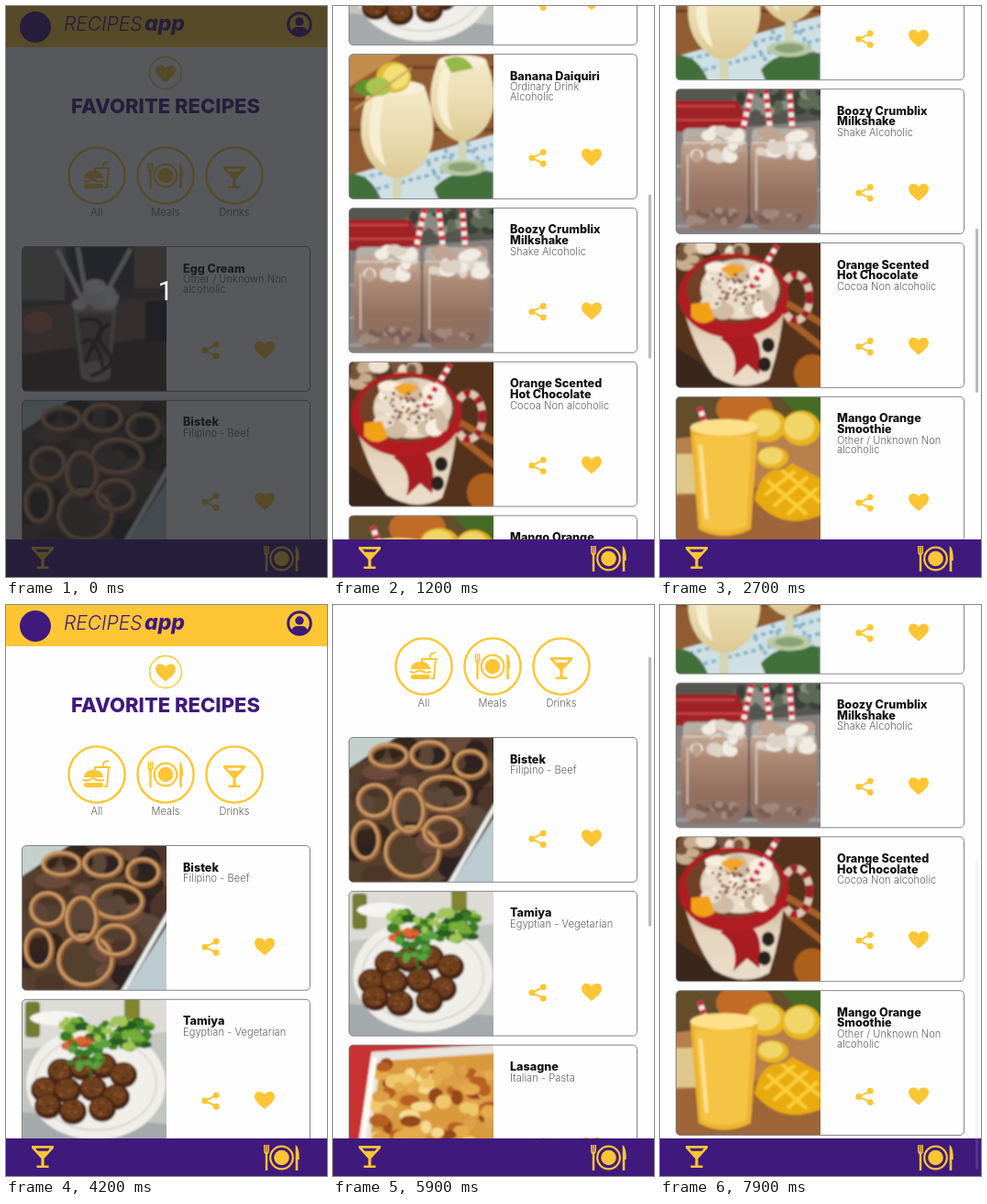
Recreate the animation shown at these times as an HTML page. Size 350 px wide and 623 px high, loop 8 s.

```html
<!DOCTYPE html>
<html lang="en">
<head>
<meta charset="utf-8">
<title>Favorite recipes</title>
<style>
  html, body { margin: 0; width: 100%; height: 100%; overflow: hidden; background: #fefefe; }
  svg { display: block; width: 100%; height: 100%; }
  text { font-family: Inter, "Open Sans", sans-serif; }
  .mid { text-anchor: middle; }
  .name { font-size: 12.6px; font-weight: 800; fill: #111; }
  .note { font-size: 11px; font-weight: 300; fill: #606060; letter-spacing: .1px; }
</style>
</head>
<body>
<svg id="stage" viewBox="0 0 350 623"></svg>
<script>
const YELLOW = '#fec635', PURPLE = '#40197d';
const LIST_TOP = 262.5, PITCH = 167.8, VIEW = 623, TRACK = 614, LOOP = 8000;

// Shape helpers
const P = (d, fill) => `<path d="${d}" fill="${fill}"/>`;
const L = (d, color, w, extra = '') =>
  `<path d="${d}" fill="none" stroke="${color}" stroke-width="${w}" ${extra}/>`;
const E = (x, y, rx, ry, fill) => `<ellipse cx="${x}" cy="${y}" rx="${rx}" ry="${ry}" fill="${fill}"/>`;
const R = (x, y, w, h, fill, r = 0) =>
  `<rect x="${x}" y="${y}" width="${w}" height="${h}" rx="${r}" fill="${fill}"/>`;
const ring = (x, y, rx, ry, color, w) =>
  `<ellipse cx="${x}" cy="${y}" rx="${rx}" ry="${ry}" fill="none" stroke="${color}" stroke-width="${w}"/>`;
const T = (x, y, cls, s) => `<text x="${x}" y="${y}" class="${cls}">${s}</text>`;
const at = (x, y, s) => `<g transform="translate(${x} ${y})">${s}</g>`;
const straw = (d, w = 6) => L(d, '#f5efea', w) + L(d, '#cf2430', w, 'stroke-dasharray="5 5"');
const base = color => R(-8, -8, 173, 173, color);
const shade = (id, ...colors) => `<linearGradient id="${id}" x2="0" y2="1">` +
  colors.map((c, i) => `<stop offset="${i / (colors.length - 1)}" stop-color="${c}"/>`).join('') + '</linearGradient>';

let seed = 7;
const rnd = (a, b) => a + (b - a) * (seed = seed * 16807 % 2147483647) / 2147483647;
const spots = (n, x0, y0, x1, y1, r, colors) => Array.from({ length: n }, (_, i) =>
  E(rnd(x0, x1), rnd(y0, y1), rnd(r * .6, r * 1.3), rnd(r * .5, r), colors[i % colors.length])).join('');

// Icons, centred on 0,0
const heart = P('M0 9C-3 6-11 1-11-4.5C-11-8-8.5-10-6-10C-3-10-1-8.5 0-6.5C1-8.5 3-10 6-10C8.5-10 11-8 11-4.5C11 1 3 6 0 9Z', YELLOW);
const share = L('M6-6L-6 0L6 6', YELLOW, 2) +
  [[-6.2, 0], [6.2, -6.2], [6.2, 6.2]].map(([x, y]) => E(x, y, 3.4, 3.4, YELLOW)).join('');
const glass = `<path fill-rule="evenodd" fill="${YELLOW}" d="M-12-12H12V-9.5L1.6 2V9.5H6.5V12H-6.5V9.5H-1.6V2L-12-9.5ZM-8-9.3H8L5.5-6.3H-5.5Z"/>`;
const plate = ring(0, 0, 12.3, 12.3, YELLOW, 2.2) + E(0, 0, 8.3, 8.3, YELLOW) +
  L('M-18.7-14V-8Q-18.7-4.5-16.5-4.5T-14.3-8V-14M-16.5-14V-5', YELLOW, 1.5) + L('M-16.5-5V14', YELLOW, 2.4) +
  P('M15.2-14Q19.3-12 19.3 2H17.8V14H15.2Z', YELLOW);
const burger = P('M-14 3C-14-8 7-8 7 3Z', YELLOW) + L('M-15 5.5Q-11 8-8 5.5T-1 5.5T8 5.5', YELLOW, 2.2) +
  R(-14, 9, 21, 5, YELLOW, 2) + L('M-2-5V-8H15M13-8L11 13H8M6-8L8-14L13-15', YELLOW, 2);
const user = ring(0, 0, 12.3, 12.3, PURPLE, 3) + E(0, -3, 4.7, 4.7, PURPLE) +
  P('M-9 8Q-7 3-3 3H3Q7 3 9 8Q0 15-9 8Z', PURPLE);

// Soft pictures on a 157 x 157 square
const goblet = (x, y, k) => `<g transform="translate(${x} ${y}) scale(${k})">` +
  R(-5, 48, 10, 38, '#d3d5b4') + E(0, 88, 28, 10, '#b9c9a4') + E(0, 87, 18, 6, '#8ba278') +
  P('M-30-44C-47 0-42 38-8 54H8C42 38 47 0 30-44Z', 'url(#cocktail)') +
  P('M-24-36C-36 2-31 30-12 42C-22 14-20-10-13-36Z', '#f8efd2') + E(0, -44, 30, 8, '#f7efd8') + '</g>';
const jar = x => R(x, 46, 73, 107, 'url(#shake)', 20) + R(x + 2, 42, 69, 17, '#b3aea6', 6) +
  spots(26, x + 9, 44, x + 64, 74, 8, ['#f0ebe3', '#ddd2c6', '#c0a390']) +
  spots(14, x + 10, 132, x + 63, 145, 5, ['#7d5f54', '#a1887c']) +
  L(`M${x + 2} 58H${x + 71}M${x + 7} 70V132`, '#d8d2cb', 1.5);

const pics = {
  cream: () => base('#51413c') + R(-8, -8, 54, 66, '#8b8072') + R(52, -8, 70, 48, '#38393f') +
    R(122, -8, 43, 53, '#8a7157') + P('M-8 66L165 54V165H-8Z', '#795746') + P('M-8 118L165 95V165H-8Z', '#4c332b') +
    E(17, 82, 16, 12, '#b7674c') + R(134, 58, 31, 45, '#20222a', 4) +
    L('M38 3L65 58M60 0L70 55M118 2L88 56', '#e5dcd6', 5) +
    P('M55 62H103L95 143Q79 151 64 143Z', '#a69486') + P('M60 72H98L93 125H66Z', '#776052') +
    L('M62 80Q94 74 82 97T69 127M96 83Q74 95 91 112T74 141M65 105Q78 90 88 132', '#302019', 4) +
    spots(20, 62, 48, 96, 64, 10, ['#f5efe9', '#e6dbd2']) + E(79, 43, 12, 8, '#fff8f0'),
  bistek: () => base('#55402f') +
    spots(60, 0, 0, 157, 157, 16, ['#35251f', '#4d362b', '#6b4c3b', '#2d2321', '#5c4639']) +
    P('M-8-8H62L-8 38Z', '#c4d0cc') + P('M165 75V165H108Z', '#bccbd0') + L('M160 72L106 165', '#e6ecea', 5) +
    [[28, 69, 18, 17], [104, 61, 27, 18], [69, 125, 29, 27], [43, 20, 20, 12], [88, 19, 20, 14], [132, 29, 17, 14],
     [65, 80, 16, 23], [18, 112, 14, 20], [102, 103, 20, 16]].map(([x, y, a, b]) =>
      ring(x, y, a, b, '#996238', 6) + ring(x - 1, y - 1, a, b, '#cfa26d', 2.5)).join(''),
  tamiya: () => base('#c3c5c1') + P('M-8-8H165V34L-8 55Z', '#dcdbd5') +
    R(3, 2, 16, 39, '#727b31', 4) + R(111, -8, 17, 30, '#82842d', 3) + P('M-8 122L165 136V165H-8Z', '#a4a9ab') +
    E(80, 91, 76, 62, '#f0eee9') + ring(80, 91, 66, 51, '#d7d7d3', 2) + E(38, 20, 30, 8, '#f5f4f0') +
    spots(75, 43, 22, 139, 53, 6, ['#397d22', '#75ad37', '#a1c556', '#265d20']) +
    spots(10, 48, 43, 73, 52, 5, ['#cb4224', '#dd6530']) +
    [[42, 78], [65, 74], [88, 72], [110, 82], [24, 98], [49, 99], [77, 97], [102, 106], [28, 116], [55, 122], [87, 119]]
      .map(([x, y]) => E(x, y, 15, 14, '#4a2617') + E(x - 1, y - 2, 12, 10.5, '#70401f') +
        spots(7, x - 9, y - 9, x + 8, y + 6, 2, ['#8b552f', '#5a2d18'])).join('') +
    L('M75 86L71 56M73 70L58 61M73 66L88 53', '#387a27', 2) + spots(18, 53, 47, 93, 76, 5, ['#348027', '#58a13d']),
  daiquiri: () => base('#925c30') + L('M-8 14H165M-8 49H165M-8 82H165', '#6b3c1f', 3) +
    P('M-8-8H68L-8 40Z', '#c38c4e') + P('M-8 134L165 85V165H-8Z', '#cfe0e4') +
    L('M5 137L157 98M12 151L157 113M80 110L112 157M104 103L137 157M128 96L157 139', '#86b3c8', 4, 'stroke-dasharray="5 4"') +
    P('M92 146Q112 122 157 128V165H100ZM-8 131Q24 124 37 165H-8Z', '#43703a') +
    goblet(123, 46, .88) + goblet(52, 80, 1) +
    E(48, 25, 19, 17, '#e3bd34') + E(51, 24, 14, 13, '#f3df78') +
    P('M4 40Q15 14 40 42Q25 50 4 40Z', '#62912c') + E(32, 35, 14, 10, '#a7c44f') + L('M5 60L68 14', '#cf9b54', 2) +
    P('M103 6Q125-5 135 15L111 20Z', '#94b84a'),
  boozy: () => base('#898482') + R(-8, -8, 173, 48, '#555650') +
    spots(28, 65, 0, 157, 25, 8, ['#5d6b55', '#8a8b82', '#3a4138']) + P('M-8 12H67L82 46H-8Z', '#9f2027') +
    L('M-8 18H64M-8 33H72', '#c6403f', 3) + P('M-8 48L165 33V165H-8Z', '#85807f') +
    L('M-8 84L165 73M-8 120L165 109M-8 149H165', '#a29c98', 3) + R(72, 62, 16, 84, '#5d5350') +
    straw('M82 0L70 55') + straw('M97 0L103 51') + straw('M123 0L127 53') + jar(5) + jar(80),
  chocolate: () => base('#55331f') + spots(22, 0, 0, 72, 24, 9, ['#c7ad8d', '#ede1cf', '#77533b']) +
    L('M121 83L165 118M120 65L165 91', '#a85e27', 7) + E(148, 142, 20, 21, '#ad611f') +
    P('M-8 108L78 165H-8Z', '#3a251e') + ring(130, 59, 15, 25, '#dfc8b4', 8) +
    `<ellipse cx="130" cy="59" rx="15" ry="25" fill="none" stroke="#a41e20" stroke-width="8" stroke-dasharray="7 8"/>` +
    P('M5 62Q18 114 41 145Q73 164 101 148Q116 102 118 60Z', 'url(#mug)') +
    P('M62 94Q98 90 90 143L77 132L62 146Q70 118 48 104Z', '#a81b22') +
    E(100, 111, 7, 8, '#29201e') + E(96, 132, 7, 8, '#29201e') +
    E(62, 57, 60, 46, '#b01a20') + E(63, 51, 52, 36, '#724128') + E(69, 50, 43, 33, '#e2d2bd') +
    spots(44, 36, 24, 102, 76, 10, ['#f8eee0', '#e9dccb', '#d0bba4']) +
    P('M16 66L35 64L42 82Q27 93 16 80Z', '#f2a117') + P('M48 28Q62 18 76 28L60 38Z', '#f0a526') +
    spots(44, 39, 33, 92, 68, 2, ['#77462b', '#a06b46']) + straw('M110 2L79 52'),
  mango: () => base('#b77f4b') + P('M-8-8H165V27L-8 46Z', '#644e2c') +
    E(74, 13, 31, 21, '#c16c28') + P('M109-8H165V28Q130 27 109-8Z', '#456b27') +
    P('M-8 109L165 89V165H-8Z', '#9d6538') + R(-8, 62, 42, 43, '#dfc78b', 4) +
    [[98, 31, 22, 18], [136, 34, 21, 19], [105, 66, 17, 12]].map(([x, y, a, b]) =>
      E(x, y, a, b, '#e7b51f') + E(x - 2, y - 2, a * .78, b * .78, '#f0d568')).join('') +
    P('M85 112Q92 76 117 79L126 72L157 89V129Q114 147 85 112Z', '#e9aa0d') +
    L('M96 107L129 81M106 119L143 87M121 128L154 99M99 91L142 128M115 80L157 115', '#f9cf38', 4) +
    straw('M25 11L35 39') + P('M15 33H89L81 144Q52 159 24 144Z', '#eeb32e') +
    P('M20 42H82L76 141Q50 151 28 141Z', '#f5c445') + E(52, 33, 37, 9, '#ffe08a') + L('M26 52L33 133', '#ffe399', 4),
  lasagne: () => base('#c83230') + P('M24 7L165-2V165H2Z', '#e8e4df') +
    P('M34 17L165 8V165H14Z', '#d99a3d') +
    spots(110, 28, 20, 157, 157, 9, ['#f0c66a', '#e5ab4b', '#b85e24', '#f6dc91', '#96461f', '#dda04a']) +
    L('M27 13L7 150', '#fffaf4', 7),
  soup: () => base('#a98965') + E(78, 82, 73, 66, '#eeebe5') + E(78, 79, 60, 51, '#cb762a') +
    spots(18, 45, 50, 110, 104, 5, ['#e9a448', '#a94d1e', '#50762c']),
  pie: () => base('#786759') + E(78, 84, 73, 62, '#e9e4d9') +
    [52, 37, 22].map((r, i) => ring(78, 81, r, r * .78, ['#b87731', '#d39a50', '#a8652c'][i], 14)).join(''),
  fries: () => base('#e1d8ca') + E(78, 88, 72, 56, '#8c5630') +
    Array.from({ length: 25 }, () => L(`M${rnd(25, 65)} ${rnd(50, 120)}L${rnd(85, 130)} ${rnd(50, 120)}`, '#d9a44a', 8)).join('')
};

// picture, title lines, note lines
const eggCream = ['cream', ['Egg Cream'], ['Other / Unknown Non', 'alcoholic']];
const bistek = ['bistek', ['Bistek'], ['Filipino - Beef']];
const tamiya = ['tamiya', ['Tamiya'], ['Egyptian - Vegetarian']];
const otherDrinks = [
  ['daiquiri', ['Banana Daiquiri'], ['Ordinary Drink', 'Alcoholic']],
  ['boozy', ['Boozy Crumblix', 'Milkshake'], ['Shake Alcoholic']],
  ['chocolate', ['Orange Scented', 'Hot Chocolate'], ['Cocoa Non alcoholic']],
  ['mango', ['Mango Orange', 'Smoothie'], ['Other / Unknown Non', 'alcoholic']]
];
const otherMeals = [
  ['lasagne', ['Lasagne'], ['Italian - Pasta']],
  ['soup', ['Corba'], ['Turkish - Side']],
  ['pie', ['Burek'], ['Croatian - Side']],
  ['fries', ['Poutine'], ['Canadian - Miscellaneous']]
];
const lists = [
  [eggCream, bistek, tamiya, ...otherDrinks, ...otherMeals],
  [bistek, tamiya, ...otherMeals],
  [eggCream, ...otherDrinks]
];

const card = ([pic, names, notes], i) => {
  const noteTop = 28 + 11.7 * names.length;
  const iconY = 105.7 + 2.5 * (names.length + notes.length);
  return at(0, LIST_TOP + i * PITCH,
    `<g clip-path="url(#photo)">${at(18, .5, `<use href="#${pic}"/>`)}</g>` +
    `<rect x="17.5" width="314" height="157.8" rx="4.5" fill="none" stroke="#858585"/>` +
    names.map((s, k) => T(193, 28 + 11.8 * k, 'name', s)).join('') +
    notes.map((s, k) => T(193, noteTop + 10.6 * k, 'note', s)).join('') +
    at(223, iconY, share) + at(282, iconY, heart));
};

const header = R(0, 0, 350, 45, YELLOW) + E(32, 23, 17, 17, PURPLE) +
  `<text x="63" y="27" font-size="21" font-style="italic" font-weight="300" fill="${PURPLE}">RECIPES</text>` +
  `<text x="151" y="27" font-size="23" font-style="italic" font-weight="800" fill="${PURPLE}">app</text>` +
  at(320, 20, user) + ring(174, 73, 17.5, 17.5, YELLOW, 1.4) + at(174, 74.5, heart) +
  `<text x="174" y="117" class="mid" font-size="22" font-weight="800" fill="${PURPLE}">FAVORITE RECIPES</text>` +
  [['All', burger], ['Meals', plate], ['Drinks', glass]].map(([s, icon], i) =>
    at(99 + 75 * i, 185, ring(0, 0, 30.6, 30.6, YELLOW, 2.4) + at(0, i === 2 ? 2 : 0, icon) + T(0, 44, 'note mid', s))).join('');

stage.innerHTML = `<defs>
  <clipPath id="photo"><path d="M175 0V157.8H22Q17.5 157.8 17.5 153V5Q17.5 0 22 0Z"/></clipPath>
  <filter id="soft"><feGaussianBlur stdDeviation=".9"/></filter>
  ${shade('shake', '#c9b4a4', '#ab8874', '#94705f', '#8b7166')}
  ${shade('cocktail', '#f3e8c8', '#ebdcb0', '#dcc994')}
  ${shade('mug', '#c9ab8b', '#e6d6c0', '#e9dcc8')}
  ${Object.entries(pics).map(([id, draw]) => `<g id="${id}" filter="url(#soft)">${draw()}</g>`).join('')}</defs>
  <g id="page">${header}${lists.map(l => `<g class="list">${l.map(card).join('')}</g>`).join('')}</g>
  ${R(0, 582, 350, 41, PURPLE)}${at(40, 602, glass)}${at(300.5, 603, plate)}
  <rect id="thumb" x="344" width="3" fill="#b9b9b9"/>
  <g id="veil"><rect width="350" height="623" fill="#1e2026" fill-opacity=".75"/>
  <text x="174" y="321" class="mid" font-size="30" fill="#fff" style="font-family:Roboto,sans-serif">1</text></g>`;

// Swipes: start, end, scroll position reached, optional acceleration power
const swipes = [
  [400, 1400, 743], [1500, 1800, 1519], [2300, 2700, 843], [2800, 3100, 360], [3200, 3500, 0],
  [4600, 5000, 681], [5500, 5900, 118], [6000, 6300, 0], [7200, 7450, 513, 1.85]
];
const groups = document.querySelectorAll('.list');

function draw(t) {
  let y = 0, alpha = 0;
  for (const [start, end, to, power] of swipes) {
    if (t <= start) break;
    const p = Math.min(1, (t - start) / (end - start));
    y += (to - y) * (power ? p ** power : 1 - (1 - p) ** 2);
    alpha = Math.max(0, Math.min(1, 1 - (t - end - 200) / 300));
  }
  const shown = t < 4100 ? 0 : t < 6900 ? 1 : 2;
  const height = 297 + PITCH * lists[shown].length;
  groups.forEach((g, i) => g.style.display = i === shown ? '' : 'none');
  page.setAttribute('transform', `translate(0 ${-y})`);
  thumb.setAttribute('y', 1.5 + TRACK * y / height);
  thumb.setAttribute('height', TRACK * VIEW / height);
  thumb.setAttribute('opacity', alpha);
  veil.style.display = t < 100 ? '' : 'none';
}

const begin = performance.now();
function tick() {
  const t = (performance.now() - begin) % LOOP;
  draw(Math.floor(t / 100) * 100); // ten steps a second
  requestAnimationFrame(tick);
}
tick();
</script>
</body>
</html>
```
